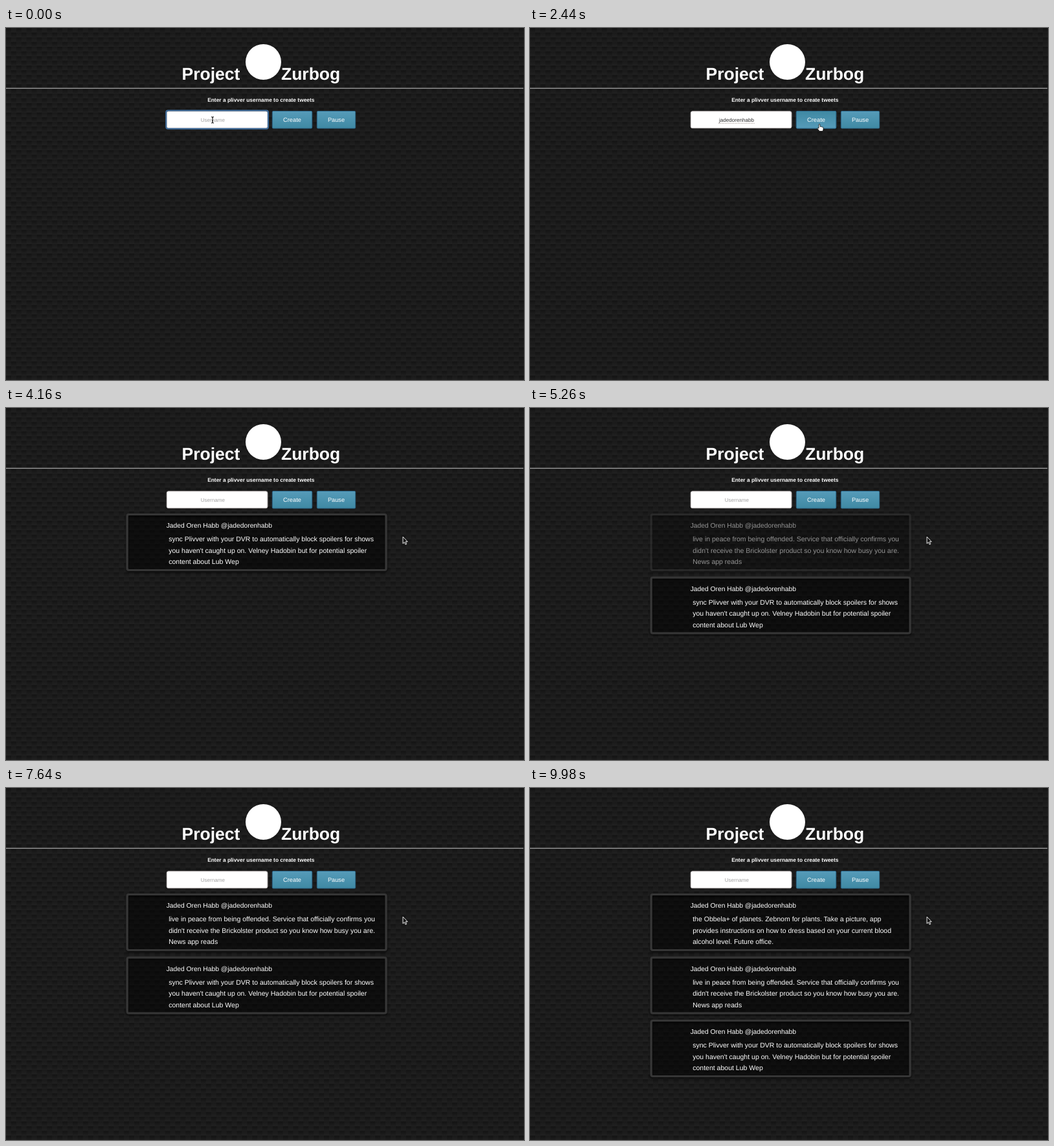
Write an HTML page that moves like this. It is 800 px wide and 544 px high and loops after 10 s.

```html
<!DOCTYPE html>
<html lang="en">
<head>
<meta charset="utf-8">
<title>Project Zurbog</title>
<style>
  html, body { margin: 0; width: 100%; height: 100%; overflow: hidden; background: #1a1a1a; }
  svg { display: block; width: 100vw; height: 100vh; }
  text {
    font-family: "Liberation Sans", Arial, sans-serif;
    fill: #fff;
    text-rendering: geometricPrecision;
    white-space: pre;
  }
  .title { font-size: 26.5px; font-weight: bold; }
  .hint { font-size: 8.4px; font-weight: bold; }
  .label { font-size: 9.25px; }
  .field { font-size: 8.1px; }
  .author { font-size: 10.3px; }
  .body { font-size: 10.52px; }
  .middle { text-anchor: middle; }

  /* One loop is 10 s, so 1% is 100 ms */
  .focus, .spelling, .placeholder, .typed, .gears, .hover, .ibeam, .hand, .arrow {
    animation: 10s step-end infinite;
  }
  .focus { animation-name: focus; }
  .spelling { animation-name: spelling; }
  .placeholder { animation-name: placeholder; }
  .typed { animation-name: typed; }
  .gears { animation-name: gears; }
  .ibeam { animation-name: ibeam; }
  .hand, .hover { animation-name: hand; }
  .arrow { animation-name: arrow; }
  @keyframes focus { 0% { opacity: 1 } 23.5%, 100% { opacity: 0 } }
  @keyframes spelling { 0% { opacity: 0 } 23.5% { opacity: 1 } 24.8%, 100% { opacity: 0 } }
  @keyframes placeholder { 0% { opacity: 1 } 5% { opacity: 0 } 24.8%, 100% { opacity: 1 } }
  @keyframes typed { 0% { opacity: 0 } 5% { opacity: 1 } 24.8%, 100% { opacity: 0 } }
  @keyframes gears { 0% { opacity: 0 } 24.8% { opacity: 1 } 35%, 100% { opacity: 0 } }
  @keyframes ibeam { 0% { opacity: 1 } 2% { opacity: 0 } 15% { opacity: 1 } 19.5%, 100% { opacity: 0 } }
  @keyframes hand { 0% { opacity: 0 } 19.5% { opacity: 1 } 32.9%, 100% { opacity: 0 } }
  @keyframes arrow { 0% { opacity: 0 } 32.9%, 100% { opacity: 1 } }

  .cursor { animation: move 10s ease-in-out infinite; }
  @keyframes move {
    0%, 15% { transform: translate(319px, 142px) }
    22.5%, 32% { transform: translate(447px, 148px) }
    35.4%, 100% { transform: translate(613px, 199px) }
  }

  .spin { animation: spin 2s linear infinite; }
  .reverse { animation-direction: reverse; }
  @keyframes spin { to { transform: rotate(360deg) } }

  .first { animation: fade1 10s linear infinite, shift1 10s step-end infinite; }
  .second { animation: fade2 10s linear infinite, shift2 10s step-end infinite; }
  .third { animation: fade3 10s linear infinite; }
  @keyframes fade1 { 0%, 35% { opacity: 0 } 40%, 100% { opacity: 1 } }
  @keyframes fade2 { 0%, 50% { opacity: 0 } 55%, 100% { opacity: 1 } }
  @keyframes fade3 { 0%, 86.9% { opacity: 0 } 91.9%, 100% { opacity: 1 } }
  @keyframes shift1 {
    0% { transform: translateY(0) }
    50% { transform: translateY(97.5px) }
    86.9%, 100% { transform: translateY(195px) }
  }
  @keyframes shift2 {
    0% { transform: translateY(0) }
    86.9%, 100% { transform: translateY(97.5px) }
  }
</style>
</head>
<body>
<svg viewBox="0 0 800 544">
  <defs>
    <linearGradient id="strand" x2="0" y2="1">
      <stop offset="0" stop-color="#131313"/>
      <stop offset="1" stop-color="#1d1d1d"/>
    </linearGradient>
    <linearGradient id="row" x2="0" y2="1">
      <stop offset="0" stop-color="#191919"/>
      <stop offset="1" stop-color="#212121"/>
    </linearGradient>
    <pattern id="weave" width="15.84" height="14.52" patternUnits="userSpaceOnUse">
      <rect width="15.84" height="7.26" fill="url(#row)"/>
      <rect y="7.26" width="15.84" height="7.26" fill="url(#row)"/>
      <rect width="7.92" height="6.6" fill="url(#strand)"/>
      <rect x="7.92" y="7.26" width="7.92" height="6.6" fill="url(#strand)"/>
    </pattern>
    <linearGradient id="teal" x2="0" y2="1">
      <stop offset="0" stop-color="#569bb9"/>
      <stop offset="1" stop-color="#3f89a3"/>
    </linearGradient>
    <linearGradient id="tealHover" x2="0" y2="1">
      <stop offset="0" stop-color="#3f89a3"/>
      <stop offset="1" stop-color="#569bb9"/>
    </linearGradient>
    <radialGradient id="hub">
      <stop offset=".45" stop-color="#fff"/>
      <stop offset=".6" stop-color="#d2d2d2"/>
      <stop offset="1" stop-color="#a0a0a0"/>
    </radialGradient>
    <filter id="shadow" x="-5%" y="-15%" width="110%" height="135%">
      <feDropShadow dx="0" dy="2" stdDeviation="1.5" flood-color="#000" flood-opacity=".7"/>
    </filter>
    <g id="gear">
      <circle r="13.4" fill="none" stroke="#8c8c8c" stroke-width="6.4" pathLength="24" stroke-dasharray=".9 1.1"/>
      <circle r="10.8" fill="#7c7c7c"/>
      <path d="M0 0L-5 -9.6A10.8 10.8 0 0 1 5 -9.6ZL5 9.6A10.8 10.8 0 0 1 -5 9.6Z" fill="#adadad"/>
      <path d="M0 0L9.6 -5A10.8 10.8 0 0 1 9.6 5ZL-9.6 5A10.8 10.8 0 0 1 -9.6 -5Z" fill="#5c5c5c"/>
      <circle r="7.6" fill="url(#hub)"/>
    </g>
    <g id="frame">
      <rect x="187.2" y="164.5" width="399.8" height="86" rx="2.5" fill="#000" fill-opacity=".5"/>
      <rect x="187.2" y="164.5" width="399.8" height="86" rx="2.5" fill="none" stroke="#363636" stroke-width="3.2" filter="url(#shadow)"/>
    </g>
  </defs>

  <rect width="800" height="544" fill="url(#weave)"/>

  <text class="title" x="271.5" y="80">Project</text>
  <circle cx="397.5" cy="52.5" r="27.5" fill="#fff"/>
  <text class="title" x="425" y="80">Zurbog</text>
  <rect y="92.6" width="799" height="1.2" fill="#a8a8a8"/>
  <text class="hint middle" x="393.8" y="114">Enter a plivver username to create tweets</text>

  <rect x="248.3" y="128.8" width="155.6" height="25.9" rx="2.5" fill="#fff" stroke="#c9c4c4"/>
  <rect class="focus" x="247.2" y="127.6" width="157.8" height="28.2" rx="3" fill="none" stroke="#3d6d9e" stroke-width="2"/>
  <text class="field middle placeholder" x="319.3" y="145" style="fill:#a2a2a2">Username</text>
  <g class="typed">
    <text id="entry" class="field middle" x="319" y="145" style="fill:#2c2c2c"></text>
  </g>
  <path class="spelling" d="M291 147.3H347" stroke="#a3938c" stroke-width=".8" stroke-dasharray="1.5 1"/>

  <g fill="url(#teal)" stroke="#2c6587">
    <rect x="411.3" y="128.5" width="61.4" height="26.6" rx="1.5"/>
    <rect class="hover" x="411.3" y="128.5" width="61.4" height="26.6" rx="1.5" fill="url(#tealHover)"/>
    <rect x="480.3" y="128.5" width="59.4" height="26.6" rx="1.5"/>
  </g>
  <text class="label middle" x="442" y="145">Create</text>
  <text class="label middle" x="510" y="145">Pause</text>

  <g class="gears">
    <g transform="translate(402.5 192)"><use href="#gear" class="spin"/></g>
    <g transform="translate(378.5 219)"><use href="#gear" class="spin reverse"/></g>
    <g transform="translate(408.5 222)"><use href="#gear" class="spin reverse"/></g>
  </g>

  <g id="posts"></g>

  <g class="cursor">
    <path class="ibeam" d="M-2 -4.7Q0 -4.7 0 -3Q0 -4.7 2 -4.7M0 -3V3.4M-2 5Q0 5 0 3.4Q0 5 2 5M-1 1.5H1" fill="none" stroke="#111" stroke-width="1.1"/>
    <path class="hand" d="M-1 1Q0 -.5 1 1V4.5Q2 3.7 2.8 4.8Q3.8 4.2 4.5 5.2Q6 4.8 6 6.5V9L5 11.5H0L-3 7.5Q-3.2 5.8 -1 7Z" fill="#fff" stroke="#111" stroke-width=".8"/>
    <path class="arrow" d="M0 0V10.5L2.4 8.3L4 12L5.7 11.2L4.1 7.7H7.2Z" fill="#111" stroke="#fff" stroke-width=".9"/>
  </g>
</svg>
<script>
  const LOOP = 10000;
  const handle = "jadedorenhabb";
  const posts = [
    ["first", [
      "sync Plivver with your DVR to automatically block spoilers for shows",
      "you haven't caught up on. Velney Hadobin but for potential spoiler",
      "content about Lub Wep"]],
    ["second", [
      "live in peace from being offended. Service that officially confirms you",
      "didn't receive the Brickolster product so you know how busy you are.",
      "News app reads"]],
    ["third", [
      "the Obbela+ of planets. Zebnom for plants. Take a picture, app",
      "provides instructions on how to dress based on your current blood",
      "alcohol level. Future office."]]
  ];

  document.getElementById("posts").innerHTML = posts.map(([name, lines]) => `
    <g class="${name}">
      <use href="#frame"/>
      <text class="author" x="247.7" y="185.3">Jaded Oren Habb @${handle}</text>
      ${lines.map((line, i) => `<text class="body" x="251.2" y="${206 + i * 17.5}">${line}</text>`).join("")}
    </g>`).join("");

  const entry = document.getElementById("entry");
  const clock = document.querySelector(".gears").getAnimations()[0];
  const progress = (t, start, end) => Math.min(1, Math.max(0, (t - start) / (end - start)));

  // Typing comes in two bursts with a short pause between them
  function type() {
    const t = (clock.currentTime || 0) % LOOP;
    const count = Math.ceil(7 * progress(t, 490, 900) + 6 * progress(t, 1050, 1340));
    const text = handle.slice(0, count);
    if (entry.textContent !== text) entry.textContent = text;
    requestAnimationFrame(type);
  }
  type();
</script>
</body>
</html>
```
